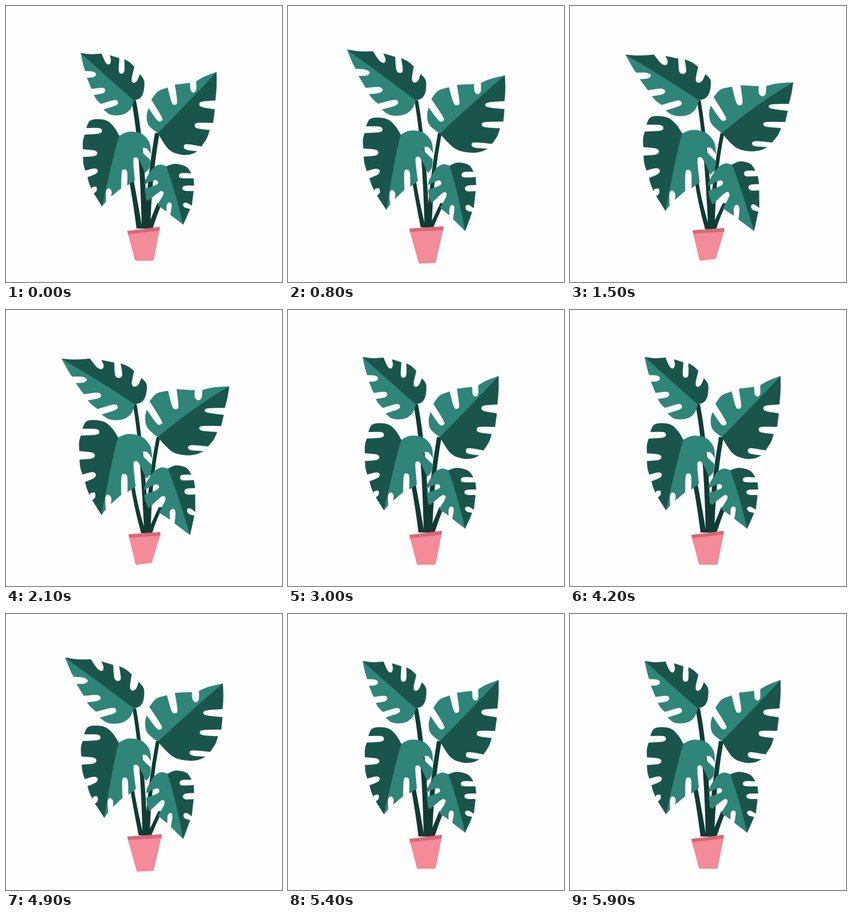
Write an HTML page that moves like this. It is 480 px wide and 480 px high and loops after 6000 ms.

```html
<!DOCTYPE html>
<html lang="en">
<head>
<meta charset="utf-8">
<title>Potted monstera</title>
<style>
  html, body { margin: 0; width: 100%; height: 100%; overflow: hidden; background: #fefefe; }
  svg { display: block; width: 100vw; height: 100vh; }
  path { stroke-linejoin: round; stroke-width: .5; }
  .light { fill: #2e8578; stroke: #2e8578; }
  .dark { fill: #19554a; stroke: #19554a; }
  .stem { fill: #103b34; }
  .pot { fill: #f38b99; stroke: #f38b99; stroke-width: 4; }
  .rim { fill: #d9677a; stroke: #d9677a; stroke-width: 1; }
</style>
</head>
<body>
<svg id="stage" viewBox="0 0 480 480"></svg>
<script>
const add = (a, b, k = 1) => [a[0] + b[0] * k, a[1] + b[1] * k];
const dot = (a, b) => a[0] * b[0] + a[1] * b[1];
const unit = a => add([0, 0], a, 1 / Math.hypot(...a));
const points = text => text.trim().split(/\s+/).map(s => s.split(',').map(Number));
const shape = (name, d) => `<path class="${name}" d="${d}"/>`;

// Smooth curve through the points, starting at the first.
function curve(p) {
  return p.slice(1).map((c, i) => {
    const b = p[i], a = p[i - 1] || b, e = p[i + 2] || c;
    const c1 = add(b, add(c, a, -1), 1 / 6), c2 = add(c, add(e, b, -1), -1 / 6);
    return `C${c1} ${c2} ${c}`;
  }).join('');
}

// A slot between two lobes with a round inner end.
function slot(from, end, to, r) {
  const dir = unit(add(end, add(from, to), -.5));
  let side = [-dir[1], dir[0]];
  if (dot(side, add(from, to, -1)) < 0) side = [dir[1], -dir[0]];
  return [from, add(end, side, r), add(end, dir, r), add(end, side, -r), to];
}

// Leaf halves run from tip to base; "(x,y)" is the inner end of a slot.
function half(text, rib, r, warp) {
  const parts = text.split(/[()]/).map(points);
  const tip = parts[0][0];
  let d = `M${warp(tip)}`;
  parts.forEach((part, i) => {
    if (i % 2) part = slot(parts[i - 1].at(-1), part[0], parts[i + 1][0], r);
    d += curve(part.map(warp));
  });
  return `${d}Q${warp(rib)} ${warp(tip)}Z`;
}

// Bends a leaf: base shift, tip pull growing along the vein, and a pull on each side.
function bend(leaf, pull) {
  if (!pull) return p => p;
  const [shift, tipPull, darkPull, lightPull] = points(pull);
  const axis = add(leaf.tip, leaf.base, -1), len = Math.hypot(...axis);
  const across = [-axis[1] / len * leaf.side, axis[0] / len * leaf.side];
  return p => {
    const rel = add(p, leaf.base, -1);
    const t = Math.max(0, dot(rel, axis) / len ** 2), s = dot(rel, across) * 2 / len;
    const q = add(add(p, shift), tipPull, t ** leaf.ease);
    return add(q, s > 0 ? darkPull : lightPull, Math.abs(s));
  };
}

const topLeft = {
  tip: [130, 82], base: [222, 164], rib: [174, 122], side: 1, ease: 1.5, r: 5,
  light: '130,82 135,104 138,113 (152,119) 141,125 149,144 (168,147) 153,155 158,163 165,170 (190,168) 170,180 180,188 193,190 207,187 217,178 222,164',
  dark: '130,82 147,84 166,83 (178,97) 181,86 197,91 (201,113) 206,93 215,98 223,106 (223,129) 233,119 240,130 239,149 233,160 222,164',
  pulls: ['', '0,0 -27,-6 0,0 -5,1', '2,0 -35,3 5,-1 -2,2']
};
const right = {
  tip: [366, 115], base: [264, 221], rib: [322, 162], side: 1, ease: 2.2, r: 5,
  light: '366,115 345,123 331,131 (326,146) 320,134 294,137 (293,167) 281,142 264,149 253,163 (267,196) 248,178 245,191 248,207 264,221',
  dark: '366,115 366,140 364,164 (341,171) 363,180 360,203 (333,208) 354,216 349,230 340,244 (314,245) 332,253 320,258 303,258 283,249 264,221',
  pulls: ['', '0,1 11,5 15,-6 -6,-4', '0,0 22,18 11,-8 -6,-8']
};
const left = {
  tip: [167, 348], base: [197, 226], rib: [190, 245], side: 1, ease: 1.5, r: 5,
  light: '167,348 174,340 (179,322) 183,331 200,317 (206,289) 211,312 224,303 (226,268) 242,290 249,282 251,268 (241,251) 252,257 249,237 235,222 213,219 197,226',
  dark: '167,348 153,326 (154,318) 149,318 145,309 142,298 (155,287) 138,286 135,275 134,263 (154,256) 134,249 134,235 137,224 (162,217) 140,212 146,200 160,197 176,200 188,211 197,226',
  pulls: ['', '-1,-2 5,8 -3,-1 1,0', '-2,-4 1,12 -5,-2 4,4']
};
const low = {
  tip: [308, 380], base: [279, 279], rib: [294, 320], side: -1, ease: 1.7, r: 4.5,
  light: '308,380 286,363 (284,346) 279,357 263,346 (270,326) 247,339 243,328 241,318 (260,307) 241,310 243,302 250,290 257,281 268,276 279,279',
  dark: '308,380 314,367 320,353 (312,346) 323,347 326,322 (311,317) 327,312 326,300 (305,295) 322,291 315,281 303,276 291,275 279,279',
  pulls: ['', '2,-1 -2,12 -2,-4 1,2', '3,-3 9,14 -5,-4 -5,6']
};
const leaves = [topLeft, right, left, low];

// Stem: top, control point, and offset from the middle of the clump.
const stems = ['222,164 237,240 1,0', '263,221 249,300 6,0', '218,303 225,340 -8,0', '267,343 258,365 10,0'].map(points);
// Clump foot, its spread, stem widths; pot corners: rim left, rim right, foot right, foot left.
const poses = [
  { foot: [240, 387], spread: 1, wide: 8, pot: '211,391 267,384 257,443 224,443' },
  { foot: [241, 385], spread: .75, wide: 6.5, pot: '211,387 270,383 257,447 227,448' },
  { foot: [244, 388], spread: .6, wide: 6.5, pot: '213,390 268,386 254,440 225,443' }
];

function drawStem([top, mid, off], { foot, spread, wide }, i) {
  const end = add(foot, off, spread), start = add(top, [i, 0]);
  const edge = (p, w) => [add(p, [-w / 2, 0]), add(p, [w / 2, 0])];
  const [a, b, c] = [edge(start, wide), edge(mid, wide), edge(end, wide + 2)];
  return shape('stem', `M${a[0]}L${a[1]}Q${b[1]} ${c[1]}L${c[0]}Q${b[0]} ${a[0]}Z`);
}

function drawPot({ pot }) {
  const [a, b, c, d] = points(pot);
  const body = [add(a, [3, 5]), add(b, [-2, 6]), add(c, [-2, -2]), add(d, [2, -2])];
  const rim = [add(a, [.5, .5]), add(b, [0, .5]), add(b, [0, 6]), add(a, [1.5, 5.5])];
  return shape('pot', `M${body.join('L')}Z`) + shape('rim', `M${rim.join('L')}Z`);
}

function drawLeaf(leaf, i) {
  const warp = bend(leaf, leaf.pulls[i]);
  return ['light', 'dark'].map(name => shape(name, half(leaf[name], leaf.rib, leaf.r, warp))).join('');
}

const stage = document.getElementById('stage');
stage.innerHTML = poses.map((pose, i) => '<g>' +
  stems.map(s => drawStem(s, pose, i)).join('') +
  leaves.map(l => drawLeaf(l, i)).join('') + drawPot(pose) + '</g>').join('');
const groups = [...stage.children];

// Holds in tenths of a second; the three poses take turns.
const holds = [...'1313122223131231312232122321221'].map(Number);
const begin = performance.now();

function show() {
  let left = (performance.now() - begin) % 6000, step = 0;
  while (step < holds.length - 1 && left >= holds[step] * 100) left -= holds[step++] * 100;
  groups.forEach((g, i) => g.style.display = i === step % 3 ? '' : 'none');
  requestAnimationFrame(show);
}
show();
</script>
</body>
</html>
```
